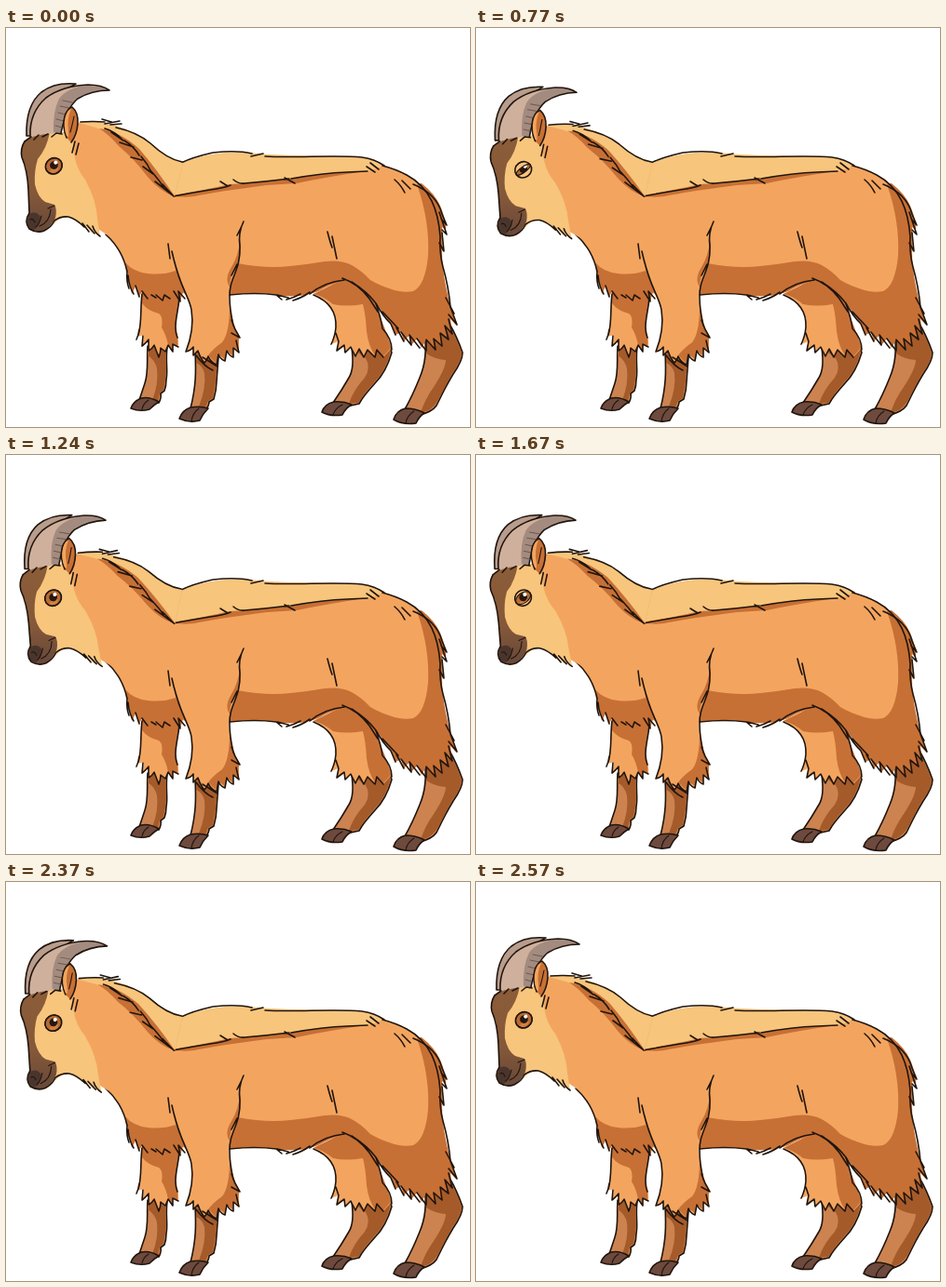
Recreate the animation shown at these times as an HTML page. Size 498 px wide and 429 px high, loop 3.24 s.

```html
<!DOCTYPE html>
<html lang="en">
<head>
<meta charset="utf-8">
<title>Goat</title>
<style>
  html, body { margin: 0; width: 100%; height: 100%; overflow: hidden; background: #fff; }
  svg { display: block; width: 498px; height: 429px; }
  path, ellipse { stroke-linecap: round; stroke-linejoin: round; }
  .line { fill: none; }
  .line, .ink { stroke: #20150d; stroke-width: 1.6; }
  .thin { fill: none; stroke: #20150d; stroke-width: 1.1; }
  .coat { fill: #f3a55f; }
  .shade { fill: #c77035; }
  .cream { fill: #f7c57c; }
  .shin { fill: #cd8350; }
  .dark { fill: #a55a2a; }
  .hoof { fill: #6d4a3d; }
</style>
</head>
<body>
<svg viewBox="0 0 498 429">
  <defs>
    <linearGradient id="muzzle" x1="0" y1="0" x2="0" y2="1">
      <stop offset="0" stop-color="#8c5d38"/>
      <stop offset=".6" stop-color="#855839"/>
      <stop offset="1" stop-color="#674839"/>
    </linearGradient>
    <clipPath id="slit"><ellipse id="opening" rx="9.2" ry="8.4"/></clipPath>
  </defs>

  <!-- far front leg -->
  <g>
    <path class="shin ink" d="M152 342C151 360 153 370 149 382Q145 394 143 400L164 403Q167 398 166 393L170 390Q172 385 172 378C174 368 171 358 173 344Z"/>
    <path class="dark" d="M152 344L172 344C171 358 173 368 171 378L169 389L165 392L163 402L157 400Q164 382 162 366Q160 357 152 352Z"/>
    <path class="hoof ink" d="M145 398Q136 402 134 409Q144 413 154 410Q159 405 164 402Q154 396 145 398Z"/>
    <path class="thin" d="M153 400Q147 404 146 410"/>
    <path class="coat" d="M146 280C144 300 146 318 141 332L148 330L146 342L153 335L153 347L159 342L164 354Q166 348 166 344L171 348L174 341L179 348L179 340L185 343Q186 335 182 322C182 308 186 298 187 284Z"/>
    <path class="shade" d="M146 280L187 284C186 298 182 308 182 322Q185 335 184 342L179 340L178 346L174 341Q172 330 167 322Q169 310 164 307Q152 304 146 296Z"/>
    <path class="line" d="M146 286C144 300 146 318 142 330M143 324Q142 331 140 335M147 331L146 342Q150 339 153 335L153 347Q157 345 159 341L164 354Q166 349 166 344L171 348L174 341L179 348L179 340L185 343M186 290C185 304 182 310 182 322Q182 328 184 333"/>
  </g>

  <!-- far hind leg -->
  <g>
    <path class="shin ink" d="M371 344C373 358 373 368 368 376Q360 390 351 403L370 406L379 404L382 399Q387 392 396 382Q408 370 414 349L410 338Z"/>
    <path class="dark" d="M374 346L413 346Q408 369 395 381Q386 391 381 399L378 403L368 404Q373 389 385 376Q392 365 386 355Z"/>
    <path class="hoof ink" d="M352 402Q342 404 339 413Q348 418 361 416Q364 409 371 405Q362 401 352 402Z"/>
    <path class="thin" d="M361 405Q353 409 351 416"/>
    <path class="coat" d="M330 286C345 293 355 304 354 322Q353 335 349 340L357 337L355 347L363 341L364 349L370 343L375 353L379 345L384 354L388 346L396 354L398 346L405 354L414 344C412 333 403 325 402 312L396 292L366 268Z"/>
    <path class="shade" d="M330 286L366 268L396 292L402 312Q411 333 413 344L405 353L398 346L396 352Q389 342 387 326Q386 308 383 297Q365 300 351 297Q342 289 330 286Z"/>
    <path class="line" d="M330 287C345 293 355 304 354 322Q353 332 349 340M354 328L357 337L355 347L363 341L364 349L370 343L375 353L379 345L384 354L388 346L396 354L398 346L405 354M397 296Q403 314 404 323Q414 334 414 346"/>
  </g>

  <!-- near hind leg -->
  <g>
    <path class="shin ink" d="M449 328C452 348 450 362 444 376Q436 396 428 410L444 416Q457 413 462 406L465 400Q471 387 480 372Q490 358 490 349Q484 332 476 318Z"/>
    <path class="dark" d="M450 332L476 320Q483 333 489 349Q489 358 479 371L464 400Q457 412 445 414Q449 400 459 386Q472 366 472 357Q460 356 451 350Z"/>
    <path class="hoof ink" d="M429 409Q419 411 416 421Q426 427 440 425Q443 418 449 414Q440 409 429 409Z"/>
    <path class="thin" d="M438 412Q430 417 429 425"/>
  </g>

  <!-- trunk -->
  <g>
    <path class="coat" d="M108 224Q124 236 130 262L140 280L190 285L200 290L240 287Q270 284 290 287Q315 291 335 283Q350 274 366 271L396 294L414 318L476 310C474 280 466 262 468 240C467 205 462 175 428 157Q415 150 404 148L388 141C350 137 300 138 262 135Q225 131 190 145L150 150L110 190Z"/>
    <path class="cream" d="M160 150L188 145Q225 131 262 134C300 139 350 136 388 140L406 147Q396 154 384 154C355 155 330 157 306 162L256 167Q215 174 180 180Z"/>
    <path class="shade" d="M178 180Q215 174 240 168L256 167L306 162Q345 156 386 154Q345 160 312 167L280 169Q225 176 202 181Q188 183 178 180Z"/>
    <path class="shade" d="M248 253Q280 259 305 256Q325 254 342 251Q360 249 371 255Q382 261 391 271Q401 277 417 282Q428 285 437 283Q450 277 453 245Q455 208 441 168L446 167Q460 185 466 215L468 240C468 265 474 285 477 300L484 320L477 313L479 329L471 321L474 335L466 329L467 342L459 334L461 346L451 335L446 344L441 334L435 341L433 330L427 337L424 327L418 330L413 318L396 294L366 271Q350 274 335 283Q315 291 290 287Q270 284 240 287Q239 268 248 253Z"/>
    <path class="shade" d="M128 252Q136 262 152 264Q168 266 182 261L199 292L190 284L187 294L181 284L175 290L171 287L168 293L161 288L155 288L152 291L146 283L143 289L139 278L135 286Z"/>
    <path class="shade" d="M446 167Q460 178 466 191Q473 208 472 218L468 214L469 241L466 230Q460 193 446 167Z"/>
    <path class="line" d="M188 145Q200 139 222 134Q248 131 264 135M263 138L276 135M278 138C310 140 355 136 382 139Q396 141 406 148M391 145L400 152M387 149L396 155M404 148Q419 152 430 158C456 172 464 197 466 224Q465 242 469 257Q475 278 477 300M417 163Q424 169 428 177M425 164L434 173"/>
    <path class="line" d="M437 168Q462 178 468 200L473 212L467 205M465 198L473 222L468 217M468 220L470 240L465 231"/>
    <path class="line" d="M180 181Q200 177 219 174Q234 172 241 169M230 165L238 170M244 163Q250 168 256 167Q280 165 304 162M299 161L310 167M306 162Q340 156 366 155L388 154"/>
    <path class="line" d="M107 222Q125 238 130 262Q129 272 132 280M131 266Q132 278 137 286M139 277L143 289M146 283L152 291M156 287L161 290M161 287L168 293L170 287L176 291M180 283L187 294L185 283L192 291"/>
    <path class="line" d="M240 287Q268 284 290 287L296 292M291 287L303 290M301 292Q309 290 316 286M308 293Q318 290 326 284M326 286Q342 273 363 271M361 269Q378 275 390 291M371 273Q388 284 397 296Q404 309 413 318M390 291L399 305M404 305L421 323M413 318L418 330M419 322L427 337M424 327L435 341L433 330L444 344M441 334L451 347L451 335L461 346L459 334L468 342L466 328L475 335L471 320L479 329L475 313M477 300L484 319L475 308M472 290L481 307"/>
    <path class="line" d="M345 219Q348 231 350 236M350 224L355 248M174 232L176 248"/>
  </g>

  <!-- near front leg -->
  <g>
    <path class="shin ink" d="M203 348C204 370 204 385 198 409L214 411Q218 406 218 402L223 399Q226 389 226 380L228 354Z"/>
    <path class="dark" d="M204 350L227 358L225 380L222 398L217 401L213 410L207 407Q215 387 213 371Q211 363 204 360Z"/>
    <path class="hoof ink" d="M198 408Q189 411 186 420Q197 425 208 422Q211 415 217 409Q208 406 198 408Z"/>
    <path class="thin" d="M207 409Q200 414 199 423"/>
    <path class="coat" d="M180 240C186 275 196 290 199 303C202 325 197 338 193 348L201 343L201 352L206 347L213 360L217 353L226 362L228 351L235 358L237 347L244 354L244 344L250 349L250 333C245 320 240 305 239 290C239 270 252 262 251 235L252 212Z"/>
    <path class="shade" d="M252 226Q253 245 247 256Q241 265 240 278Q234 270 242 257Q249 246 252 226Z"/>
    <path class="shade" d="M240 298Q243 318 250 333L249 347L244 344L243 352L237 347L235 356L228 351L225 360L217 352Q222 345 232 338Q240 328 240 298Z"/>
    <path class="line" d="M178 240Q182 258 187 271M181 252C187 278 197 290 199 303C202 322 197 338 193 348Q198 347 201 343L201 352L206 347Q209 356 213 360Q216 357 217 353Q220 360 226 362L228 351Q230 356 235 358L237 347Q240 353 244 354L244 344L250 349L247 336M204 352Q213 364 222 368M211 354L227 364M242 314Q245 324 251 333L242 328M255 208Q249 220 251 235C252 262 239 268 240 290Q240 302 244 320M253 213L248 223M248 254L242 266"/>
  </g>

  <!-- head and neck -->
  <g id="head">
    <path class="coat" d="M58 114L80 101L115 104Q140 112 160 128Q175 142 190 145L181 181L150 205L122 230L108 222L97 215L75 200Z"/>
    <path class="cream" d="M78 102Q100 98 115 104Q140 112 158 126Q176 142 190 145L181 180Q166 160 150 142Q132 122 110 112Q95 106 78 102Z"/>
    <path class="shade" d="M100 108Q122 111 143 130Q162 152 181 181Q165 176 152 160Q137 140 121 127Q110 114 100 108Z"/>
    <path class="cream" d="M42 112L64 112L73 125Q72 147 85 163Q97 185 98 205L101 224L94 217L93 221L86 213L82 213Q74 203 66 203Q58 203 52 210L30 195L25 150Z"/>
    <path fill="url(#muzzle)" d="M18 124Q28 113 47 112Q44 129 34 141Q30 154 31 168Q34 182 42 187L52 190Q55 195 53 204Q48 214 41 218Q32 221 25 216Q20 210 25 199Q25 172 21 149Q14 138 18 124Z"/>
    <path fill="#4a352d" d="M25 200Q32 196 37 203Q36 213 30 217Q21 215 23 206Z"/>
    <path class="line" d="M20 122Q15 130 17 139Q23 153 24 174L25 199Q19 208 25 216Q33 221 41 218Q49 214 52 207Q59 202 67 203Q75 205 84 214M82 210L89 219M87 212L95 221M93 213Q95 220 101 224"/>
    <path class="thin" d="M36 213Q47 209 48 195M45 194L52 191M26 206Q29 204 31 209M38 202Q36 211 32 214"/>
    <path class="line" d="M80 101Q93 100 106 101M103 98L113 101M106 103L122 100M112 104L124 103M118 107Q141 112 155 124Q173 141 189 144"/>
    <path class="line" d="M106 108Q116 111 124 119M113 112L126 121M122 123L137 128M127 121Q137 127 143 137M134 139L146 142M145 138Q152 146 156 155M147 149L158 157M155 153Q164 163 169 171M160 165L179 180M168 168L180 181M74 122L71 134M78 124L75 136"/>

    <path class="ink" fill="#b89c8c" d="M22 116Q21 83 38 69Q52 58 75 60L47 76L30 116Z"/>
    <path fill="#cfb09c" d="M26 118Q25 91 43 75Q61 62 88 61Q103 61 111 67Q92 67 77 76Q64 87 59 114Q42 112 26 118Z"/>
    <path fill="#a48b7f" d="M57 76Q66 64 88 61Q103 61 111 67Q92 67 77 76Q64 87 59 113L51 112Q50 90 57 76Z"/>
    <path class="line" d="M26 116Q25 91 43 75Q61 62 88 61Q103 61 111 67Q92 67 77 76Q64 87 59 113M20 122L27 117M30 120L35 115M39 117L45 114M49 117L54 113L60 114"/>
    <path fill="none" stroke="#6f584d" d="M61 78L71 80M58 84L68 86M56 91L64 93M54 98L62 100M53 105L60 107"/>

    <path class="shade ink" d="M65 118Q60 106 63 95Q66 86 71 85Q78 91 77 103Q76 115 70 123"/>
    <path class="coat" d="M65 116Q61 105 64 95Q66 88 70 87Q65 98 67 110L67 117Z"/>
    <path class="thin" d="M73 95Q71 105 69 112"/>

    <g transform="translate(51.3 148.3) rotate(-34)">
      <ellipse class="cream" rx="9.2" ry="8.4"/>
      <g clip-path="url(#slit)">
        <ellipse fill="#b86a32" rx="9.2" ry="8.4"/>
        <ellipse fill="#d08143" cx="-2" cy="4" rx="5" ry="3"/>
        <ellipse fill="#27170f" cx=".5" cy="-.5" rx="4.4" ry="4.3"/>
        <ellipse fill="#fff" cx="3.7" cy="-1.9" rx="2.1" ry="2"/>
      </g>
      <ellipse id="lids" class="thin" rx="9.2" ry="8.4"/>
      <ellipse class="line" rx="9.2" ry="8.4"/>
    </g>
  </g>
</svg>
<script>
  const LOOP = 3240, TILT = -2.25, EYE = 8.4;
  // time in ms, head drop 0..1, eye opening 0..1
  const steps = [
    [0, 0, 1], [670, .3, .65], [770, .75, .36], [870, 1, 0],
    [1040, 1, .36], [1140, 1, .65], [1240, 1, 1],
    [1670, 1, .65], [1770, 1, .36], [1870, 1, 0],
    [2040, 1, .36], [2140, 1, .65], [2240, 1, 1],
    [2370, .62, 1], [2470, .25, 1], [2570, 0, 1]
  ];
  const get = id => document.getElementById(id);
  const head = get('head'), opening = get('opening'), lids = get('lids');
  const start = performance.now();

  function draw() {
    const t = (performance.now() - start) % LOOP;
    const [, drop, open] = steps.findLast(step => step[0] <= t) || steps[0];
    head.setAttribute('transform', `rotate(${TILT * drop} 188 169)`);
    // a tiny height keeps the closed lid line visible
    const height = Math.max(.05, EYE * open);
    opening.setAttribute('ry', height);
    lids.setAttribute('ry', height);
    requestAnimationFrame(draw);
  }
  draw();
</script>
</body>
</html>
```
